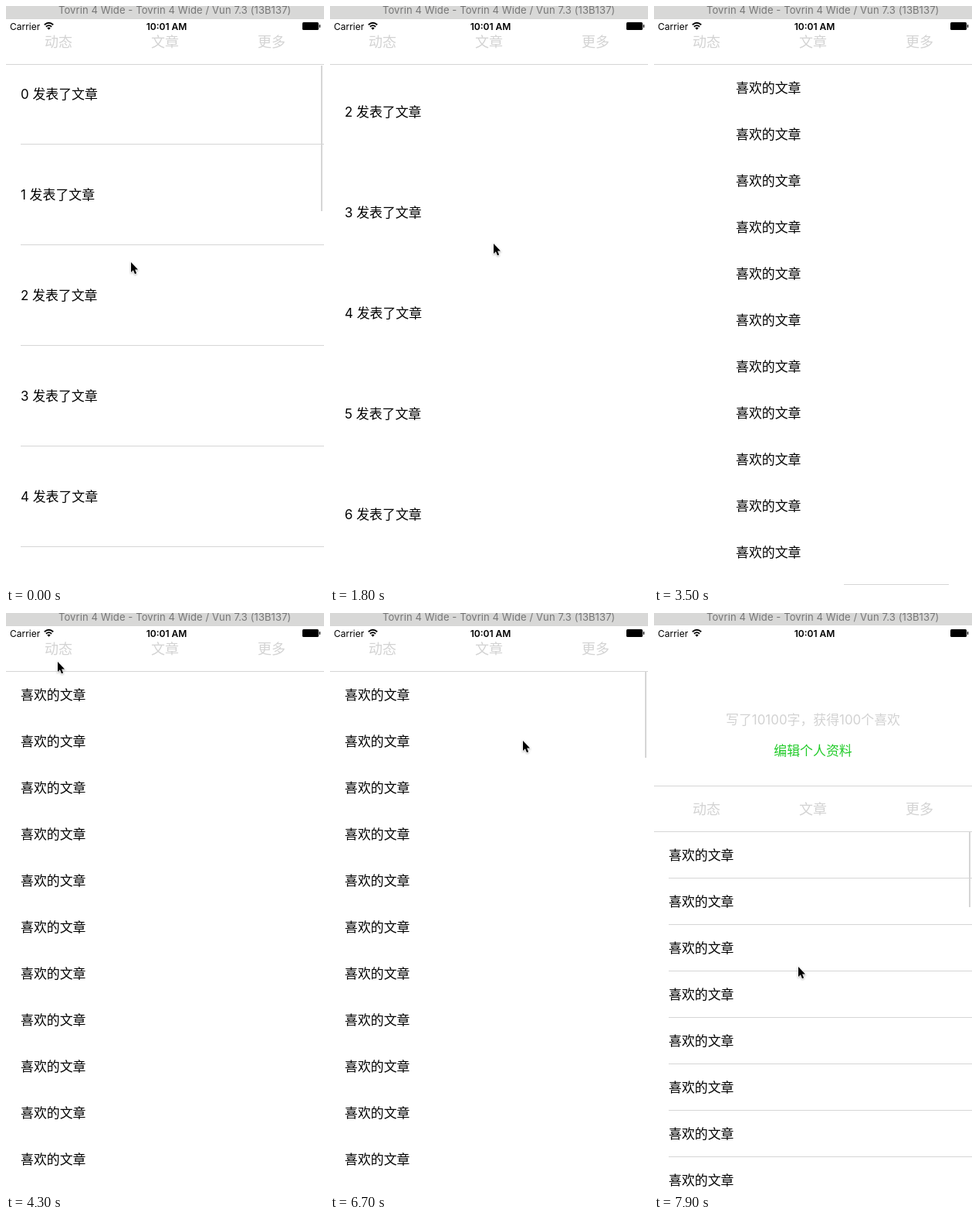
These frames come from a looping animation (412x748 px, 8 s). An HTML page:

```html
<!DOCTYPE html>
<html lang="zh-CN">
<head>
<meta charset="utf-8">
<style>
  html, body { margin: 0; width: 100%; height: 100%; overflow: hidden; background: #fff; }
  body { font: 16.9px Inter, "Noto Sans CJK SC", "Noto Sans CJK", sans-serif; color: #000; }
  #stage { position: relative; width: 412px; height: 748px; overflow: hidden; background: #fff; }
  #stage div, #stage svg { position: absolute; white-space: nowrap; }
  #view { left: 0; top: 76px; width: 412px; height: 748px; overflow: hidden; }
  .page { top: 0; width: 412px; }
  .page .row { left: 0; width: 412px; text-indent: 19px; }
  .lines .row::after { content: ""; position: absolute; left: 19px; right: 0; bottom: 0; height: 1px; background: #d6d6d6; }
  #head { left: 0; top: -184px; width: 412px; height: 260px; background: #fff; text-align: center; }
  #head div { left: 0; width: 412px; line-height: 30px; }
  #note { top: 100px; color: #d2d2d2; }
  #edit { top: 140px; color: #22cb2a; }
  #head #tabs { top: 200px; height: 58px; border: solid #d6d6d6; border-width: 1px 0; background: #fff; }
  #tabs div { font-size: 18px; line-height: 60px; color: #d3d3d3; }
  #title { left: 0; top: 0; width: 412px; height: 16px; background: #d8d8d7; overflow: hidden; }
  #title div { left: 68px; top: -5px; font-size: 13px; line-height: 20px; letter-spacing: .1px; color: #777; }
  .status { top: 17px; font-size: 12px; line-height: 20px; }
  .bar { background: #d6d6d6; }
  #vbar { left: 408px; width: 2px; }
  #hbar { top: 747px; width: 136px; height: 1px; }
  #cursor { left: -1px; top: -1px; overflow: visible; filter: drop-shadow(0 1px 1px rgba(0,0,0,.3)); }
</style>
</head>
<body>
<div id="stage">
  <div id="view"></div>
  <div id="head">
    <div id="note">写了10100字，获得100个喜欢</div>
    <div id="edit">编辑个人资料</div>
    <div id="tabs"></div>
  </div>
  <div class="bar" id="vbar"></div>
  <div class="bar" id="hbar"></div>
  <div id="title"><div>Tovrin 4 Wide - Tovrin 4 Wide / Vun 7.3 (13B137)</div></div>
  <div class="status" style="left:5px">Carrier</div>
  <div class="status" style="left:108px;width:200px;text-align:center;font-weight:600">10:01 AM</div>
  <svg style="left:49px;top:20px" width="13" height="12" fill="none" stroke="#000" stroke-width="1.8">
    <path d="M.8 4.2Q6.5 -.8 12.2 4.2M2.9 6.7Q6.5 3.6 10.1 6.7"/>
    <path d="M4.3 8.3Q6.5 6.6 8.7 8.3L6.5 10.8Z" fill="#000" stroke="none"/>
  </svg>
  <svg style="left:384px;top:21px" width="24" height="10">
    <rect width="21" height="10" rx="1.5"/><rect x="21.8" y="3" width="1.4" height="4" rx=".7"/>
  </svg>
  <svg id="cursor" width="14" height="20">
    <path d="M1 1V14L3.9 11.3L6 16.2L8.1 15.3L6.1 10.6H10Z" stroke="#fff" stroke-width="1.4" paint-order="stroke"/>
  </svg>
</div>
<script>
const LOOP = 8000, STEP = 100, W = 412;
const $ = id => document.getElementById(id);

function add(parent, cls, text, css) {
  const el = document.createElement('div');
  el.className = cls;
  el.textContent = text;
  Object.assign(el.style, css);
  return parent.appendChild(el);
}

const pages = [
  { n: 20, h: 130, label: i => i + ' 发表了文章' },
  { n: 12, h: 150, label: i => '关于' + i + '的文章' },
  { n: 20, h: 60, label: () => '喜欢的文章' }
].map(({ n, h, label }) => {
  const page = add($('view'), 'page', '');
  for (let i = 0; i < n; i++)
    add(page, 'row', label(i), { top: i * h + 'px', height: h + 'px', lineHeight: h + 'px' });
  return page;
});
['动态', '文章', '更多'].forEach((name, i) =>
  add($('tabs'), '', name, { left: i * 138 - 138 + 'px' }));

const part = (t, from, to) => Math.min(1, Math.max(0, (t - from) / (to - from)));
const smooth = (t, from, to) => { const p = part(t, from, to); return p * p * (3 - 2 * p); };
const coast = (t, from, to) => 1 - (1 - part(t, from, to)) ** 3;
const bounce = (t, from, to) => Math.sin(Math.PI * part(t, from, to));

// Where the pointer pauses or turns: [time, x, y].
const stops = [
  [0, 162, 331], [1100, 117, 115],
  [2200, 253, 390], [2600, 65, 388],
  [3150, 205, 384], [3500, -20, 384],
  [4400, 70, 52], [5200, 210, 52], [5600, 210, 52], [6100, 343, 52],
  [6700, 250, 165], [7300, 237, 386], [7900, 187, 457]
];

function pointer(t) {
  const i = stops.findLastIndex((s, n) => s[0] <= t && n < stops.length - 1);
  const [t0, x0, y0] = stops[i], [t1, x1, y1] = stops[i + 1];
  const p = smooth(t, t0, t1);
  return [x0 + (x1 - x0) * p, y0 + (y1 - y0) * p];
}

// Two swipes, then one jump per tapped tab.
function pageX(t) {
  if (t >= 6300) return 2 * W;
  if (t >= 5400) return W;
  if (t >= 4600) return 0;
  return W * (smooth(t, 2200, 3050) + smooth(t, 3145, 3650));
}

function move(el, x, y) {
  el.style.transform = `translate(${Math.round(x)}px,${Math.round(y)}px)`;
}

function draw(t) {
  const scroll = 27 + 237 * coast(t, 0, 1800);
  const head = 200 * smooth(t, 6700, 7200) + 48 * bounce(t, 7200, 7933);
  const x = Math.round(pageX(t));

  pages.forEach((p, i) => move(p, i * W - x, i ? 0 : -scroll));
  // Hairlines show only at rest.
  pages[0].classList.toggle('lines', t < 100);
  pages[2].classList.toggle('lines', t >= 7900);
  move($('view'), 0, head);
  move($('head'), 0, head);

  const pulled = t >= 6700;
  const bar = $('vbar').style;
  bar.opacity = pulled ? 1 : 1 - part(t, 1500, 1800);
  bar.top = Math.round(pulled ? 75 + head : 77 + (scroll - 27) * .257) + 'px';
  bar.height = (pulled ? 112 - 2 * Math.max(0, head - 200) : 188) + 'px';

  move($('hbar'), 3 + x * .33, 0);
  $('hbar').style.opacity = t < 2200 ? 0 : 1 - part(t, 3900, 4300);
  move($('cursor'), ...pointer(t));
}

const start = performance.now();
function tick() {
  const t = (performance.now() - start) % LOOP;
  draw(Math.floor(t / STEP) * STEP);
  requestAnimationFrame(tick);
}
tick();
</script>
</body>
</html>
```
